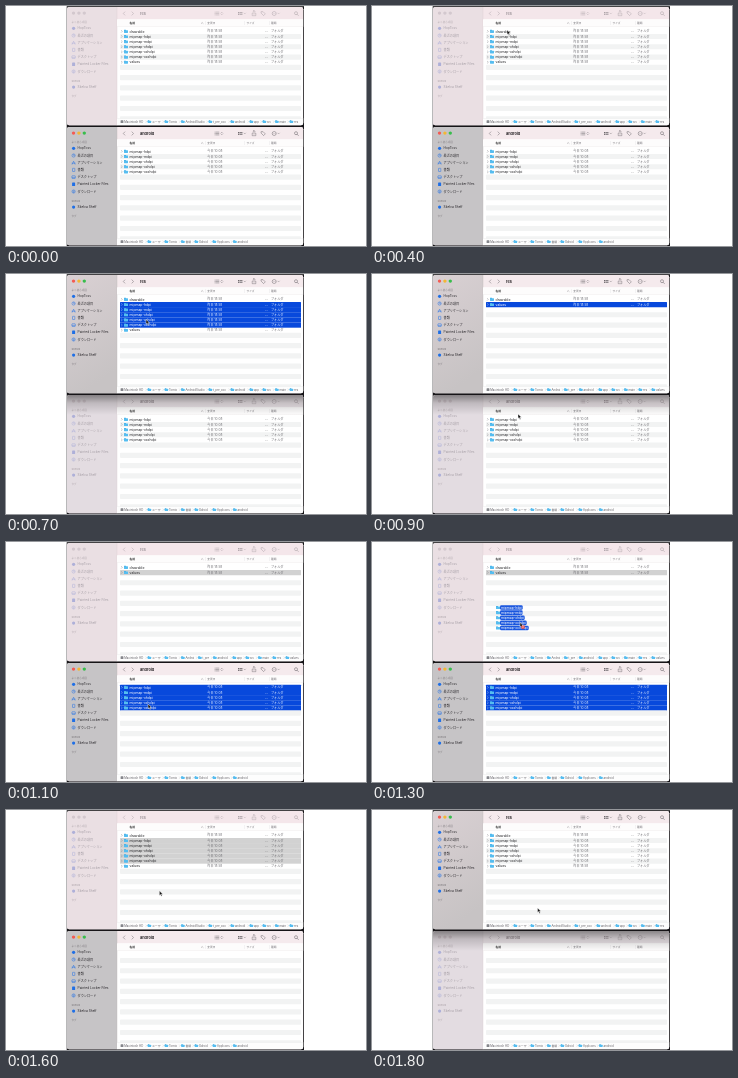
Write an HTML page that moves like this. It is 360 by 240 pixels and loops after 2000 ms.

```html
<!DOCTYPE html>
<html>
<head>
<meta charset="utf-8">
<title>Moving folders</title>
<style>
html, body { margin: 0; width: 100%; height: 100%; overflow: hidden; background: #fff; }
svg { display: block; width: 360px; height: 240px; }
text { font-family: Inter, "Noto Sans CJK JP", "Noto Sans CJK", "Noto Sans", sans-serif; }
</style>
</head>
<body>
<svg id="stage" viewBox="0 0 360 240" xmlns="http://www.w3.org/2000/svg"></svg>
<script>
const stage = document.getElementById('stage');
const TOP = 22.8, PITCH = 5.14, BLUE = '#0849dc', LOOP = 2000;
const MIPMAPS = ['h', 'm', 'xh', 'xxh', 'xxxh'].map(s => `mipmap-${s}dpi`);
const FULL = ['drawable', ...MIPMAPS, 'values'];
const REST = ['drawable', 'values'];
const ALL = [0, 1, 2, 3, 4];

const rect = (x, y, w, h, fill, more = '') =>
  `<rect x="${x}" y="${y}" width="${w}" height="${h}" fill="${fill}" ${more}/>`;
const dot = (x, y, r, fill, more = '') =>
  `<circle cx="${x}" cy="${y}" r="${r}" fill="${fill}" ${more}/>`;
const line = (d, color, w = 0.5) =>
  `<path d="${d}" fill="none" stroke="${color}" stroke-width="${w}" stroke-linecap="round" stroke-linejoin="round"/>`;
// y is the middle of the line of text
const text = (x, y, s, size, fill, weight = 400) =>
  `<text transform="translate(${x} ${y + size * 0.36}) scale(.1)" font-size="${size * 10}" font-weight="${weight}" fill="${fill}">${s}</text>`;

function folder(x, y, w = 4) {
  const h = w * 0.78;
  return rect(x, y - h / 2, w * 0.5, h * 0.5, '#3fa9e0', 'rx=".3"') +
    rect(x, y - h / 2 + 0.45, w, h - 0.45, '#55bdf0', 'rx=".4"');
}

// Sidebar entries: label, middle, icon shape
const PLACES = [
  ['HopToss', 22.3, 'disc'],
  ['最近の項目', 29.5, 'clock'],
  ['アプリケーション', 36.7, 'apps'],
  ['書類', 43.9, 'page'],
  ['デスクトップ', 51.1, 'screen'],
  ['Painted Locker Files', 58.3, 'file'],
  ['ダウンロード', 65.5, 'down'],
  ['Skelva Shelf', 81.1, 'disc']
];

function placeIcon(kind, y, c) {
  const x = 67.6, ring = dot(x, y, 1.6, 'none', `stroke="${c}" stroke-width=".5"`);
  switch (kind) {
    case 'disc': return dot(x, y, 1.6, c);
    case 'clock': return ring + line(`M${x} ${y - 1}v1h.8`, c, 0.4);
    case 'apps': return line(`M${x - 1.4} ${y + 1.5}l1.4 -3l1.4 3m-3 -1h3.2`, c);
    case 'page': return rect(x - 1.1, y - 1.6, 2.3, 3.2, 'none', `stroke="${c}" stroke-width=".5" rx=".3"`);
    case 'screen': return rect(x - 1.7, y - 1.3, 3.4, 2.5, 'none', `stroke="${c}" stroke-width=".5" rx=".3"`) +
      line(`M${x - 1.2} ${y + 0.7}h2.4`, c);
    case 'file': return rect(x - 1.5, y - 1.8, 3, 3.6, c, 'rx=".4"');
    default: return ring + line(`M${x} ${y - 0.9}v1.7m-.7 -.6l.7 .6l.7 -.6`, c, 0.4);
  }
}

function sidebar(active) {
  const ink = active ? '#2b292d' : '#a8a1a8';
  const tint = active ? '#1f6fe6' : '#aeb0d8';
  const label = active ? '#858185' : '#b4abb1';
  const lights = active ? ['#f45b53', '#f3b734', '#38bd4c'] : ['#d3c8ce', '#d3c8ce', '#d3c8ce'];
  return lights.map((c, i) => dot(67.5 + i * 5.4, 7.1, 1.7, c)).join('') +
    text(65.5, 16.2, 'よく使う項目', 2.6, label, 500) +
    text(65.5, 75.3, 'Skelva', 2.7, label, 500) +
    text(65.5, 90.2, 'タグ', 2.6, label, 500) +
    PLACES.map(([s, y, kind]) =>
      placeIcon(kind, y, tint) + text(71.6, y, s, /[a-z]/.test(s) ? 3.25 : 3.12, ink)).join('');
}

function toolbar(title, active) {
  const c = active ? '#6d686c' : '#aea5aa', y = 7.5;
  const down = x => line(`M${x} ${y - 0.4}l.8 .8l.8 -.8`, c, 0.4);
  let s = line(`M118.8 ${y - 1.6}l-1.5 1.6l1.5 1.6`, c) +
    line(`M126 ${y - 1.6}l1.5 1.6l-1.5 1.6`, c) +
    text(134, y, title, 3.8, active ? '#282427' : '#a0979c', 700);
  for (let i = -1; i < 2; i++) s += line(`M209 ${y + i * 1.4}h.3m1 0h2.6`, c);
  s += line(`M215 ${y - 0.5}l.8 -.8l.8 .8m-1.6 1l.8 .8l.8 -.8`, c, 0.4);
  for (let i = 0; i < 6; i++)
    s += rect(232 + i % 3 * 1.6, y - 1.5 + (i > 2) * 1.7, 1.2, 1.2, c);
  s += down(238) +
    line(`M246.8 ${y - 0.4}h-.6v2.6h3.6v-2.6h-.6m-1.2 1v-3.6m-1 1l1 -1l1 1`, c, 0.45) +
    line(`M255.4 ${y - 1.8}h1.7l2.2 2.2l-1.7 1.7l-2.2 -2.2z`, c) +
    dot(268.2, y, 2, 'none', `stroke="${c}" stroke-width=".5"`) +
    [-1, 0, 1].map(i => dot(268.2 + i, y, 0.3, c)).join('') + down(271.8) +
    dot(290, y - 0.3, 1.5, 'none', `stroke="${c}" stroke-width=".55"`) +
    line(`M291.2 ${y + 0.9}l1.2 1.2`, c, 0.55);
  return s;
}

function columns() {
  const c = '#77757a';
  return rect(111, 13.4, 187, 7.2, '#fdfcfc') +
    text(123.5, 17, '名前', 2.8, '#333', 700) + line('M195.3 17.4l.9 -.8l.9 .8', c, 0.4) +
    text(201.3, 17, '変更日', 2.7, c) + text(240.5, 17, 'サイズ', 2.7, c) + text(265, 17, '種類', 2.7, c) +
    [199.3, 238.5, 263.2].map(x => rect(x, 15, 0.3, 4, '#dedbdd')).join('') +
    rect(111, 20.4, 187, 0.3, '#e3e0e1');
}

function rows({ items, picked, active, date }) {
  const fill = active ? BLUE : '#d2d2d2';
  let s = '';
  for (let i = 0; i < 18; i++) {
    const y = TOP + i * PITCH;
    const on = picked.includes(i);
    if (on) s += rect(114, y, 181, PITCH + 0.05, fill, i === picked[0] ? 'rx=".5"' : '');
    else if (i % 2) s += rect(114, y, 181, PITCH, '#f2f3f3', 'rx=".8"');
    if (i >= items.length) continue;
    const mid = y + PITCH / 2, white = on && active;
    const soft = white ? '#e8f0ff' : '#717075';
    s += line(`M115.4 ${mid - 0.9}l.9 .9l-.9 .9`, soft, 0.4) + folder(118, mid) +
      text(123.6, mid, items[i], 3.4, white ? '#fff' : '#2a2a2d') +
      text(201.3, mid, date(items[i]), 3.1, soft) +
      text(259, mid, '--', 3.1, soft) + text(265, mid, 'フォルダ', 3.1, soft);
  }
  return s;
}

// Path bar entries: [x of the text, label]
const HOME = [[118.3, 'Macintosh HD'], [146, 'ユーザ'], [163, 'Tomio']];
const PATHS = {
  res: [...HOME, [179.5, 'AndroidStudio'], [207, 't_pre_xxx'], [229, 'android'],
    [248, 'app'], [261, 'src'], [273.5, 'main'], [288, 'res']],
  values: [...HOME, [179.5, 'Androi'], [196.5, 't_pre'], [211.5, 'android'],
    [231, 'app'], [244, 'src'], [256.5, 'main'], [271, 'res'], [284, 'values']],
  android: [...HOME, [179.5, '書類'], [193, 'Xdroid'], [211, 'AppIcons'], [231.5, 'android']]
};

function pathBar(name) {
  return rect(111, 112.4, 187, 8, '#fdfdfd') + rect(111, 112.3, 187, 0.3, '#e2e0e1') +
    PATHS[name].map(([x, s], i) =>
      (i ? line(`M${x - 6} 115l.6 .7l-.6 .7`, '#aaa', 0.35) + folder(x - 4.3, 115.7, 3.4)
        : rect(x - 3.7, 114.3, 2.8, 2.8, '#85868b', 'rx=".4"')) +
      text(x, 115.7, s, 2.85, '#626066')).join('');
}

function pane(w) {
  const side = w.active ? (w.dy ? '#c6c4c6' : 'url(#lit)') : w.dy ? '#e3dce1' : '#eadfe3';
  const head = w.active ? '#f5eaed' : w.dy ? '#ece5e9' : '#f4e6ea';
  const shade = w.dy && !w.active ? rect(61, 1, 237, 20, 'url(#shade)') : '';
  return `<g transform="translate(0 ${w.dy})"><g clip-path="url(#frame)">` +
    rect(61, 1, 237, 119, '#fff') + rect(61, 1, 50, 119, side) + rect(111, 1, 187, 12.4, head) +
    rect(110.8, 1, 0.4, 119, w.active ? '#bdb7ba' : '#d9ced3') +
    sidebar(w.active) + toolbar(w.title, w.active) + columns() +
    rows(w) + pathBar(w.path) + shade + '</g></g>';
}

function ghosts(dx, dy) {
  return MIPMAPS.map((s, i) => {
    const y = 145.3 + i * PITCH + dy;
    return folder(119 + dx, y) +
      rect(123 + dx, y - 2.3, 22.7 + Math.max(0, s.length - 11) * 2, 4.6, BLUE, 'rx="1.4" opacity=".92"') +
      text(123.9 + dx, y, s, 3.4, '#fff');
  }).join('');
}

const arrow = (x, y) =>
  `<path transform="translate(${x} ${y})" d="M0 0v4.6l1.1 -1l.8 1.8l.9 -.4l-.8 -1.7h1.5z" fill="#111" stroke="#fff" stroke-width=".45"/>`;

// Pointer stops: time in ms, x, y
const STOPS = [[100, 168, 84], [400, 135, 24], [500, 135, 29], [700, 140, 45.5], [900, 146, 140],
  [1000, 132, 144], [1100, 142, 162], [1200, 143, 155], [1300, 148, 80.5], [1400, 147.5, 74],
  [1500, 147.3, 72.3], [1800, 165.5, 98]];

function pointer(t) {
  const i = Math.max(1, STOPS.findIndex(p => p[0] >= t));
  const [a, b] = [STOPS[i - 1], STOPS[i]];
  const k = (t - a[0]) / (b[0] - a[0]);
  return [a[1] + (b[1] - a[1]) * k, a[2] + (b[2] - a[2]) * k];
}

const DEFS = `<defs>
  <clipPath id="frame"><rect x="61" y="1" width="236.2" height="118.2" rx="2.2"/></clipPath>
  <linearGradient id="lit" x2=".3" y2="1"><stop stop-color="#d9d0d3"/><stop offset="1" stop-color="#c7c3c4"/></linearGradient>
  <linearGradient id="shade" x2="0" y2="1"><stop stop-opacity=".42"/><stop offset=".4" stop-opacity=".16"/>
  <stop offset="1" stop-opacity="0"/></linearGradient></defs>`;

function scene(t) {
  const upperOn = (t >= 500 && t < 1000) || t >= 1700;
  const moved = t >= 1400, removed = t >= 800 && !moved;
  const drag = t === 1200 || t === 1300;
  let upPick = [], lowPick = [];
  if (t >= 500 && t < 800) upPick = [1, 2, 3, 4, 5].slice(0, (t - 400) / 100 * 2 - 1);
  else if (removed) upPick = [1];
  else if (moved && t < 1700) upPick = [1, 2, 3, 4, 5];
  if (t === 1000) lowPick = [0];
  else if (t > 1000 && !moved) lowPick = ALL;

  const fresh = '今日 10:08', old = '昨日 18:58';
  const upper = { dy: 0, active: upperOn, title: 'res', items: removed ? REST : FULL, picked: upPick,
    date: s => moved && MIPMAPS.includes(s) ? fresh : old, path: removed ? 'values' : 'res' };
  const lower = { dy: 120, active: !upperOn, title: 'android', items: moved ? [] : MIPMAPS,
    picked: lowPick, date: () => fresh, path: 'android' };

  let s = DEFS + rect(0, 0, 360, 240, '#fff') + rect(60.7, 0.2, 237.3, 239.8, '#161417') +
    pane(upper) + pane(lower);
  if (t >= 100) {
    const [x, y] = pointer(t);
    if (drag) s += ghosts(x - 143, y - 160.3);
    s += arrow(x, y);
    if (drag) s += dot(x + 3, y + 4.6, 1.9, '#e8403a') + text(x + 2.1, y + 4.6, '5', 2.8, '#fff', 600);
  }
  return s;
}

let shown = -1;
function render(ms) {
  const t = Math.min(1800, Math.floor(ms % LOOP / 100) * 100);
  if (t !== shown) {
    shown = t;
    stage.innerHTML = scene(t);
  }
}

const start = performance.now();
function tick() {
  render(performance.now() - start);
  requestAnimationFrame(tick);
}
tick();
</script>
</body>
</html>
```
